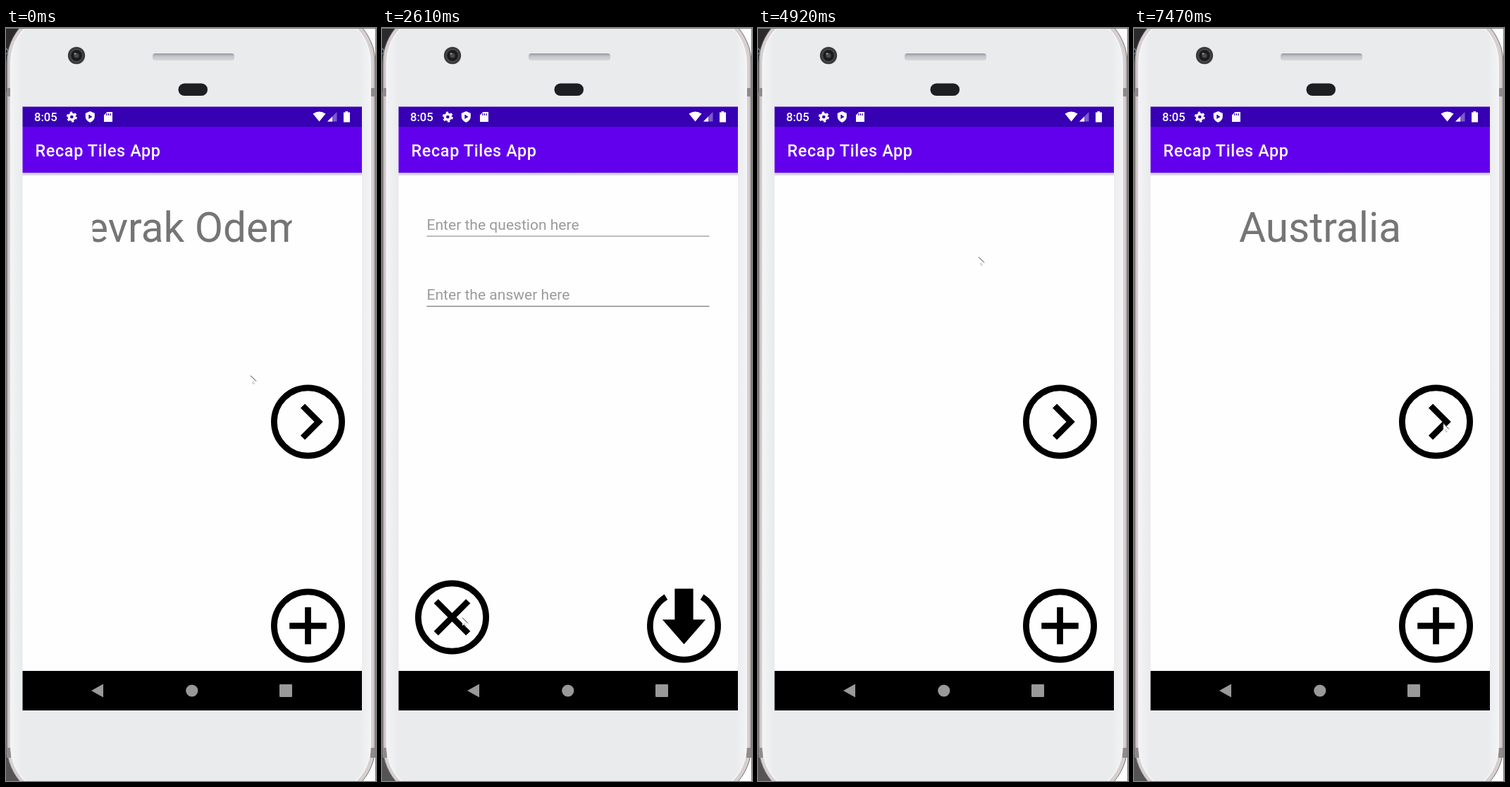
These frames come from a looping animation (525 px wide and 1067 px high, 8 s). An HTML page:

```html
<!DOCTYPE html>
<html lang="en">
<head>
<meta charset="utf-8">
<title>Recap Tiles App</title>
<style>
html, body { margin: 0; width: 100%; height: 100%; overflow: hidden; background: #fff; }
svg { display: block; width: 525px; height: 1067px; font-family: Roboto, sans-serif; }
.card { font-size: 58.5px; fill: #757575; text-anchor: middle; }
.hint { font-size: 21.06px; fill: #9b9b9b; }
.title { font-size: 23.4px; font-weight: 500; letter-spacing: .65px; fill: #fff; }
.clock { font-size: 16.6px; font-weight: 500; fill: #fff; }
.icon { fill: none; stroke: #000; stroke-width: 2; }
</style>
</head>
<body>
<svg viewBox="0 0 525 1067">
  <defs>
    <linearGradient id="rim"><stop offset="0" stop-color="#a09a9b"/><stop offset=".006" stop-color="#d6d0d1"/><stop offset=".5" stop-color="#c4bfc0"/><stop offset=".994" stop-color="#d6d0d1"/><stop offset="1" stop-color="#a09a9b"/></linearGradient>
    <linearGradient id="body"><stop offset="0" stop-color="#f3f3f5"/><stop offset=".03" stop-color="#e9ebec"/><stop offset=".97" stop-color="#e9ebec"/><stop offset="1" stop-color="#f3f3f5"/></linearGradient>
    <linearGradient id="slot" x2="0" y2="1"><stop offset="0" stop-color="#92969f"/><stop offset=".4" stop-color="#c3c5ca"/><stop offset="1" stop-color="#d8d8da"/></linearGradient>
    <linearGradient id="shade" x2="0" y2="1"><stop offset="0" stop-color="#b4b4b4"/><stop offset="1" stop-color="#fefefe"/></linearGradient>
    <clipPath id="screen"><rect x="23.5" y="111.5" width="481.500" height="855.500"/></clipPath>
    <clipPath id="wipeAdd"><rect x="23" y="111" width="482" height="860"/></clipPath>
    <clipPath id="wipeHome"><rect x="23" y="111" width="482" height="860"/></clipPath>
    <clipPath id="iris1"><circle cx="264.200" cy="282"/></clipPath>
    <clipPath id="iris2"><circle cx="264.200" cy="282"/></clipPath>
    <g id="frame">
      <rect x="23" y="111" width="482" height="856" fill="#fefefe"/>
      <rect x="23" y="205" width="482" height="5" fill="url(#shade)"/>
      <rect x="23" y="111" width="482" height="29" fill="#3700b3"/>
      <rect x="23" y="140" width="482" height="65" fill="#6200ee"/>
      <text class="title" x="41.500" y="182">Recap Tiles App</text>
      <rect x="23" y="911" width="482" height="56" fill="#000"/>
    </g>
    <circle id="ring" cx="12" cy="12" r="11"/>
    <g id="buttons" class="icon">
      <g transform="translate(376 505.5) scale(4.375)">
        <use href="#ring"/><path d="M10.300 6.850L15.450 12 10.300 17.150"/>
      </g>
      <g transform="translate(376 794.5) scale(4.375)">
        <use href="#ring"/><path d="M6 12H18M12 6V18"/>
      </g>
    </g>
  </defs>

  <rect width="525" height="1067" fill="#fff"/>
  <rect width="60" height="90" fill="#2b2b2d"/>
  <text x="-4" y="37" font-size="14" fill="#7fa3bd">o</text>
  <rect y="90" width="2" height="977" fill="#6b6869"/>
  <rect y="1030" width="40" height="37" fill="#555354"/>
  <rect x="1" y="-28" width="523" height="1123" rx="78" fill="url(#rim)" stroke="#77716f"/>
  <path d="M1 85h6v12h-6zM517 85h7v12h-7zM1 1020h6v14h-6zM517 1020h7v14h-7z" fill="#8f8a8b"/>
  <rect x="7" y="-22" width="510" height="1111" rx="72" fill="url(#body)" stroke="#f5f4f6" stroke-width="2"/>
  <path d="M0 .5H525M524.500 0V1067" stroke="#77787a"/>

  <circle cx="100" cy="39" r="12.200" fill="#3b3b3d"/>
  <circle cx="100" cy="39" r="8.500" fill="#1b1b1c" stroke="#58585a"/>
  <circle cx="100" cy="39" r="3.600" fill="#48494c"/>
  <circle cx="98" cy="36.500" r="1.400" fill="#8b8d92"/>
  <rect x="208" y="36" width="116" height="10" rx="4" fill="url(#slot)"/>
  <rect x="244.500" y="78.500" width="41.500" height="17.500" rx="8.700" fill="#1d1e22"/>

  <g clip-path="url(#screen)">
    <g id="home1">
      <use href="#frame"/><use href="#buttons"/>
      <g clip-path="url(#iris1)"><text class="card" x="264" y="303">Hevrak Odemu</text></g>
    </g>
    <g id="add" clip-path="url(#wipeAdd)">
      <use href="#frame"/>
      <text class="hint" x="63.500" y="286">Enter the question here</text>
      <text class="hint" x="63.500" y="385.300">Enter the answer here</text>
      <path d="M63.500 295H464.500M63.500 394.300H464.500" stroke="#7c7c7c" stroke-width="1.200"/>
      <g class="icon" transform="translate(47 782.5) scale(4.375)">
        <use href="#ring"/><path d="M6.800 6.800L17.200 17.200M17.200 6.800L6.800 17.200"/>
      </g>
      <g transform="translate(376 794.5) scale(4.375)">
        <path class="icon" d="M6.150 2.700A11 11 0 1 0 17.850 2.700"/>
        <path d="M9 0H15V10H19L12 18 5 10H9Z"/>
      </g>
    </g>
    <g id="home2" clip-path="url(#wipeHome)">
      <use href="#frame"/><use href="#buttons"/>
      <g id="ask1" class="card">
        <text x="264" y="303">Who is the 44th</text>
        <text x="264" y="371.500">president of the</text>
        <text x="264" y="440">United States</text>
      </g>
      <text id="ask2" class="card" x="264" y="303">Kangaroos</text>
      <g clip-path="url(#iris2)"><text id="reply2" class="card" x="264" y="303">Australia</text></g>
    </g>

    <text class="clock" x="40" y="132.300">8:05</text>
    <g fill="#fff">
      <circle cx="93.300" cy="126" r="4" fill="none" stroke="#fff" stroke-width="3.400"/>
      <circle cx="93.300" cy="126" r="6.300" fill="none" stroke="#fff" stroke-width="2.400" stroke-dasharray="3.3 3.3"/>
      <path d="M119.300 118l6.500 2.700v4.800c0 4-2.800 6.800-6.500 8.300-3.700-1.500-6.500-4.300-6.500-8.300v-4.800z"/>
      <path d="M117.300 122.500l5.200 3.200-5.200 3.200z" fill="#3700b3"/>
      <path d="M143.500 119h7.500v14h-12v-9.500z"/>
      <path d="M142.800 121v3M145.500 121v3M148.200 121v3" stroke="#3700b3" stroke-width="1.200"/>
      <path d="M435.500 121.500q9-6 18 0l-9 11z"/>
      <path d="M469.500 119v13.500h-13.500z" opacity=".35"/>
      <path d="M463 125.500v7h-7z"/>
      <path d="M481.500 118h3.500v1.500h3v14h-9v-14h2.500z"/>
    </g>
    <g fill="#999">
      <path d="M121 939l17-9.500v19z"/>
      <circle cx="263.800" cy="939" r="8.600"/>
      <rect x="388" y="930" width="18" height="18" rx="1"/>
    </g>
  </g>

  <g id="cursor">
    <path d="M0 0V12L3 9.500 5 14 7 13 5 8.800H9Z" fill="#fff"/>
    <path d="M0 .5L8 8.500" stroke="#333"/>
    <path d="M2 10.500l2.500-1.500M3 11.500l1.500 1 1-1.500" fill="none" stroke="#888" stroke-width=".8"/>
  </g>
</svg>
<script>
const LOOP = 8000, REVEAL = 1500, SWITCH = 425;
const OPEN_ADD = 1690, OPEN_HOME = 3060, ANSWER = 5850;

// time, x, y of the pointer tip
const path = [
  [0, 347, 492], [120, 347, 492], [1020, 424, 818], [1170, 424, 821], [1290, 424, 831],
  [1589, 424, 831], [1590, 370, 841], [2610, 114, 835], [3040, 114, 835], [3890, 391, 519],
  [4350, 391, 519], [4800, 313, 324], [6000, 313, 324], [6810, 440, 552],
  [6930, 440, 552], [7470, 439, 560], [LOOP, 439, 560]
];

const $ = id => document.getElementById(id);
const clamp = v => Math.max(0, Math.min(1, v));
const span = (t, a, b) => clamp((t - a) / (b - a));
const smooth = k => (1 - Math.cos(Math.PI * k)) / 2;
const show = (id, on) => $(id).setAttribute('display', on ? 'inline' : 'none');
const move = (id, x, y) => $(id).setAttribute('transform', `translate(${x} ${y})`);

// cubic-bezier(.4, 0, .2, 1)
function fastOutSlowIn(x) {
  let lo = 0, hi = 1, s = x;
  for (let i = 0; i < 20; i++) {
    s = (lo + hi) / 2;
    const bx = 1.2 * s * (1 - s) ** 2 + .6 * s * s * (1 - s) + s ** 3;
    if (bx < x) lo = s; else hi = s;
  }
  return 3 * s * s * (1 - s) + s ** 3;
}

function openScreen(t, start, below, above, wipe) {
  const k = span(t, start, start + SWITCH);
  const p = k === 0 || k === 1 ? k : fastOutSlowIn(k);
  show(above, k > 0);
  show(below, k < 1);
  move(below, 0, -17 * p);
  move(above, 0, 35 * (1 - p));
  $(wipe).firstElementChild.setAttribute('y', 111 + 820 * (1 - p));
}

function iris(id, t, start, radius) {
  const k = span(t, start, start + REVEAL);
  $(id).firstElementChild.setAttribute('r', k < 1 ? radius * smooth(k) : 600);
}

function pointer(t) {
  const i = path.findIndex(p => p[0] > t);
  const [a, x, y] = path[i - 1], [b, u, v] = path[i];
  const k = smooth(span(t, a, b));
  move('cursor', x + (u - x) * k, y + (v - y) * k);
}

function draw(t) {
  iris('iris1', t, -974, 195);
  iris('iris2', t, ANSWER, 121);
  openScreen(t, OPEN_ADD, 'home1', 'add', 'wipeAdd');
  if (t >= OPEN_HOME) openScreen(t, OPEN_HOME, 'add', 'home2', 'wipeHome');
  else show('home2', false);

  move('ask1', -481 * span(t, 4350, 4750) ** 2, 0);
  show('ask1', t < 4750);
  move('ask2', 55 * (1 - span(t, 5170, 5320)), 0);
  show('ask2', t >= 5170 && t < ANSWER);
  show('reply2', t > ANSWER);
  pointer(t);
}

const begin = performance.now();
function tick() {
  draw((performance.now() - begin) % LOOP);
  requestAnimationFrame(tick);
}
tick();
</script>
</body>
</html>
```
